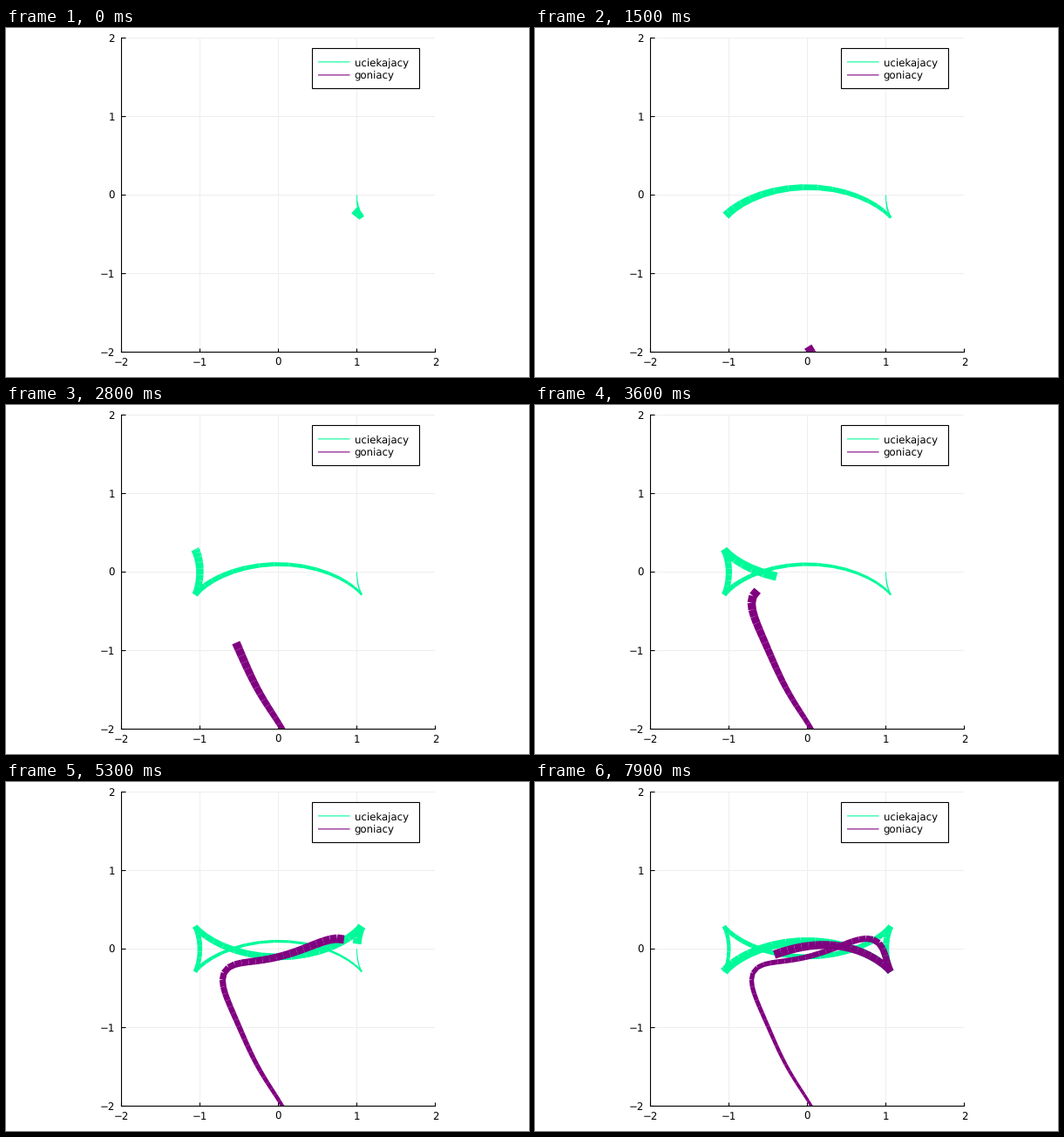
Write a matplotlib script that moves like this. It is 600 by 400 pixels and loops after 8000 ms.

```python
import numpy as np
import matplotlib.pyplot as plt
from matplotlib.animation import FuncAnimation
from matplotlib.collections import LineCollection
from matplotlib.patches import Rectangle

W, H, DPI = 600, 400, 100
PX = 72 / DPI
FRAMES, INTERVAL = 80, 100
DT, HEAD = 0.1, 10          # time step, points in the opening trail
SPEED, SUBSTEPS = 0.9, 100
THIN, THICK = 1, 10
GREEN, PURPLE = "mediumspringgreen", "purple"

plt.rcParams.update({"font.family": "DejaVu Sans", "font.size": 11.8 * PX,
                     "text.hinting": "none"})


def runner(t):
    """Talbot's curve with a = b = 1 and f^2 = 0.9."""
    s, c = np.sin(t), np.cos(t)
    return np.stack([(1 + 0.9 * s**2) * c, (-0.8 + 0.9 * s**2) * s], axis=-1)


def chase(n, start=(0.0, -4.0)):
    """Constant-speed pursuit of the runner, sampled every DT."""
    h = DT / SUBSTEPS
    prey = runner(np.arange(n * SUBSTEPS) * h)
    q = np.array(start)
    path = []
    for i, p in enumerate(prey):
        if i % SUBSTEPS == 0:
            path.append(q.copy())
        gap = p - q
        dist = np.hypot(*gap)
        if dist > 0:
            q = q + gap * min(1, SPEED * h / dist)
    return np.array(path)


def segments(path):
    return np.stack([path[:-1], path[1:]], axis=1)


total = HEAD + FRAMES - 1
tracks = [segments(runner(np.arange(total) * DT)), segments(chase(total))]

fig = plt.figure(figsize=(W / DPI, H / DPI), dpi=DPI, facecolor="white")

# plot area, given in pixels
left, top, side = 132.45, 11.45, 360
ax = fig.add_axes([left / W, 1 - (top + side) / H, side / W, side / H])
ax.set(xlim=(-2, 2), ylim=(-2, 2), xticks=range(-2, 3), yticks=range(-2, 3))
ax.set_axisbelow(True)
ax.grid(color="#eeeeee", lw=PX)
ax.spines[["top", "right"]].set_visible(False)
for name in ("left", "bottom"):
    ax.spines[name].set_linewidth(1.1 * PX)
ax.tick_params(direction="in", length=4.5 * PX, width=1.1 * PX)
ax.tick_params(axis="y", pad=7.6 * PX)
ax.tick_params(axis="x", pad=6 * PX)

trails = []
for color in (GREEN, PURPLE):
    trail = LineCollection([], colors=color, capstyle="butt", zorder=2.2)
    trails.append(ax.add_collection(trail, autolim=False))

# legend, in pixel coordinates
key = fig.add_axes([0, 0, 1, 1])
key.set(xlim=(0, W), ylim=(H, 0))
key.axis("off")
key.add_patch(Rectangle((351.4, 23.4), 123, 45.6, fc="white", ec="black",
                        lw=1.1 * PX))
for y, color, label in ((38.9, GREEN, "uciekajacy"), (53.9, PURPLE, "goniacy")):
    key.plot([358, 394.5], [y, y], color=color, lw=1.1 * PX,
             solid_capstyle="butt", snap=False)
    key.text(399.8, y + 4.1, label, va="baseline")


def update(frame):
    n = HEAD + frame
    widths = np.linspace(THIN, THICK, n)[:-1] * PX
    for trail, track in zip(trails, tracks):
        trail.set_segments(track[:n - 1])
        trail.set_linewidths(widths)
    return trails


anim = FuncAnimation(fig, update, frames=FRAMES, interval=INTERVAL,
                     repeat=True, repeat_delay=0)
plt.show()
```
